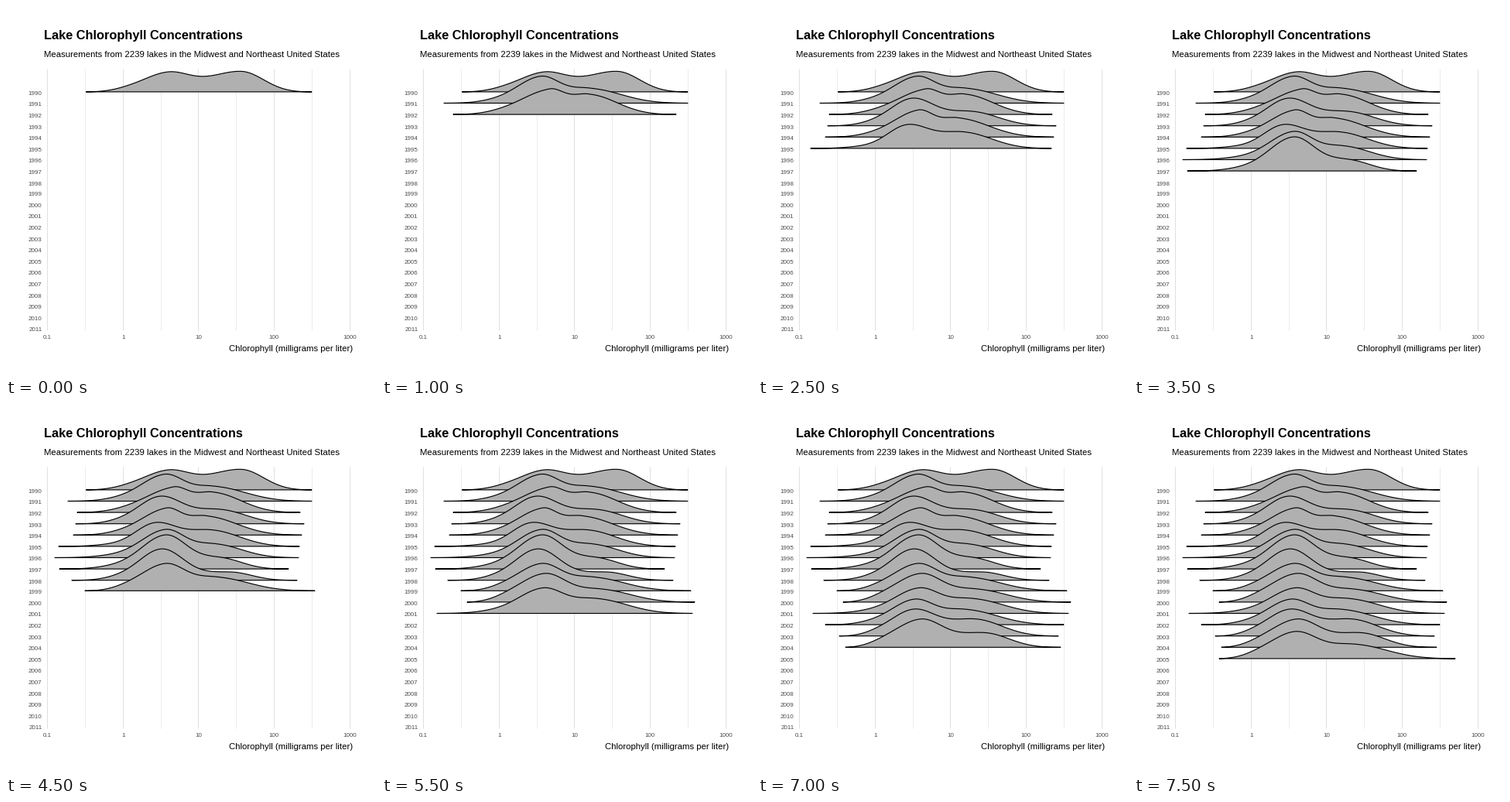
Recreate the animation shown at these times as a matplotlib script. Size 478 by 478 pixels, loop 8 s.

```python
import numpy as np
import matplotlib.pyplot as plt
from matplotlib.animation import FuncAnimation

SIZE, DPI = 478, 64
FIRST_YEAR, LAST_YEAR = 1990, 2011

plt.rcParams["font.family"] = "Liberation Sans"


def pt(px):
    return px * 72 / DPI


fig = plt.figure(figsize=(SIZE / DPI, SIZE / DPI), dpi=DPI, facecolor="white")
ax = fig.add_axes([0, 0, 1, 1])
ax.set(xlim=(0, SIZE), ylim=(SIZE, 0))
ax.axis("off")


def label(x, y, text, px, color="black", **kw):
    ax.text(x, y, text, fontsize=pt(px), color=color, va="baseline", **kw)


def base_y(year):
    k = year - FIRST_YEAR
    return 110.9 + 14.6 * k - (k >= 9)


def bump(x, center, left_sd, right_sd):
    """Bell curve with its own spread on each side."""
    sd = np.where(x < center, left_sd, right_sd)
    return np.exp(-((x - center) / sd) ** 2 / 2)


def density(x, left, right, peak, height, hump, hump_height):
    """Main peak, lower hump to its right and a faint left tail."""
    gap = hump - peak
    main = bump(x, peak, 0.42 * (peak - 130), min(0.38 * gap, 28))
    second = bump(x, hump, 0.45 * gap, 0.32 * (right - hump))
    tail_sd = (peak - left) / 6
    tail = bump(x, (left + peak) / 2, tail_sd, tail_sd)
    ends = np.tanh((x - left) / 15) * np.tanh((right - x) / 25)
    return ends * ((height - 0.085 * hump_height) * main
                   + hump_height * second + 0.05 * height * tail)


# Grid and axis labels
for i in range(9):
    x = int(53.3 + 48.9 * i) + 0.5
    major = i % 2 == 0
    ax.plot([x, x], [81, 419], color="#e0e0e0" if major else "#ebebeb",
            linewidth=pt(1), solid_capstyle="butt", zorder=1)
    if major:
        label(x, 430, f"{10 ** (i // 2 - 1):g}", 8, "#4d4d4d", ha="center")

for year in range(FIRST_YEAR, LAST_YEAR + 1):
    label(46.7, base_y(year) + 3.9, str(year), 8, "#4d4d4d", ha="right")

label(49, 43, "Lake Chlorophyll Concentrations", 16.35, weight="bold")
label(49, 66, "Measurements from 2239 lakes in the Midwest "
      "and Northeast United States", 11.39)
label(448, 445.5, "Chlorophyll (milligrams per liter)", 11.36, ha="right")

# Per year: left and right tip, peak x and height, hump x and height
SHAPES = [
    (103.5, 395, 209, 25.8, 303, 26.5),
    (80, 395, 205, 34.8, 268, 18.5),
    (92, 380, 216, 33, 267, 25.5),
    (90, 385, 199, 35.6, 275, 18),
    (87, 382, 207, 35, 258, 24),
    (68, 379, 193, 30.8, 265, 20.5),
    (63, 378, 206, 36.5, 270, 17),
    (69, 365, 206, 44, 276, 14),
    (85, 376, 201, 40.5, 290, 10.5),
    (102, 399, 206, 35.3, 272, 17),
    (110, 404, 210, 37, 282, 16),
    (71, 401, 208, 33, 276, 18.5),
    (87, 395, 202, 33, 268, 19),
    (105, 388, 201, 34.7, 280, 21.5),
    (113, 391, 210, 36.5, 292, 18.5),
    (110, 415, 208, 35, 284, 18),
]

ridges = []
for k, shape in enumerate(SHAPES):
    x = np.linspace(shape[0], shape[1], 320)
    y = base_y(FIRST_YEAR + k) - density(x, *shape)
    ridges += ax.fill(x, y, facecolor="#b0b0b0", edgecolor="black",
                      linewidth=pt(1.15), joinstyle="round", zorder=2 + k)


def update(frame):
    for k, ridge in enumerate(ridges):
        ridge.set_visible(k <= frame)
    return ridges


anim = FuncAnimation(fig, update, frames=len(ridges), interval=500,
                     init_func=lambda: update(0), repeat=True, repeat_delay=0)
plt.show()
```
